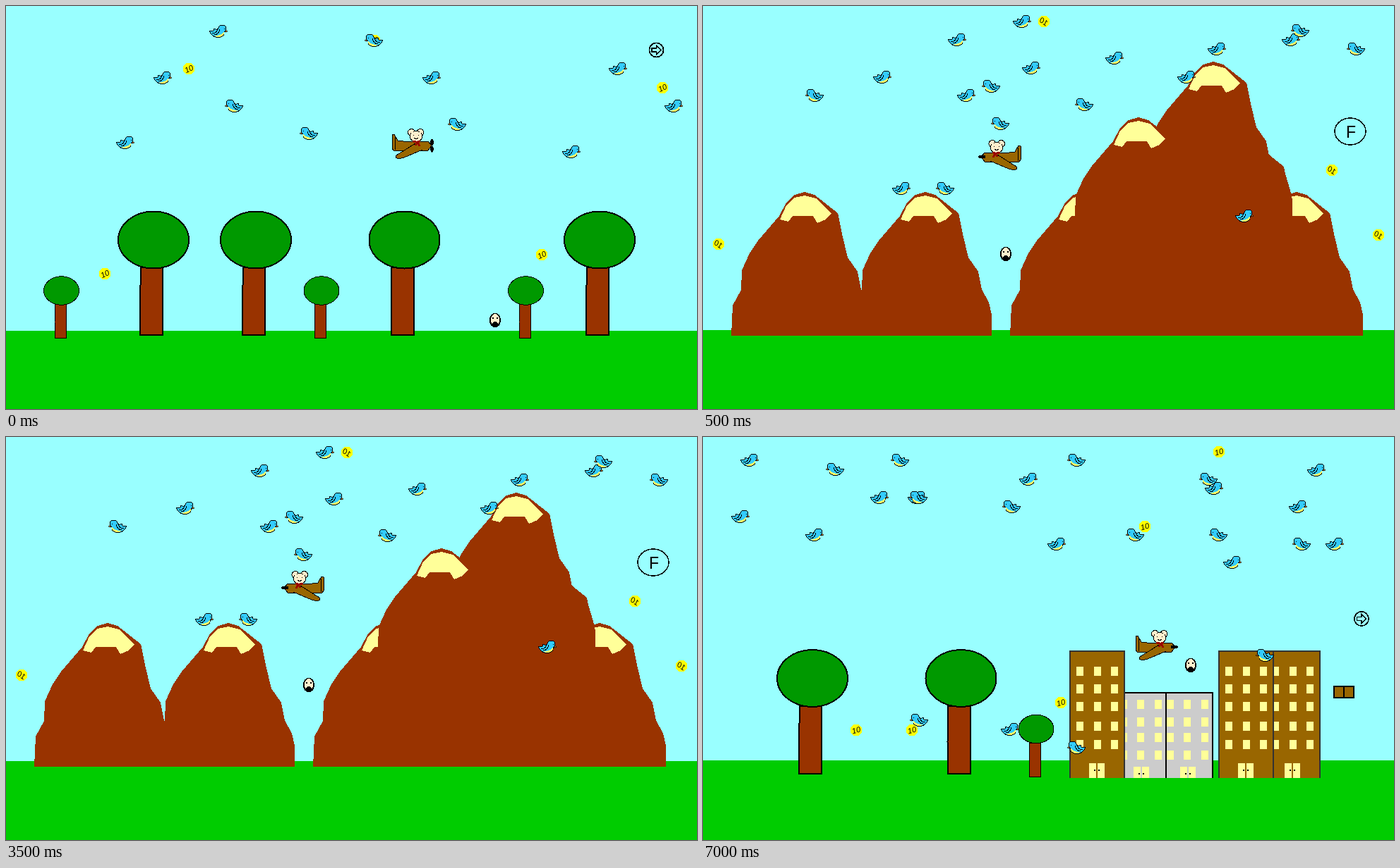
Animation of 979x572 px, one loop 8000 ms. Source, as an HTML page:

```html
<!DOCTYPE html>
<html lang="en">
<head>
<meta charset="utf-8">
<title>Flying mouse</title>
<style>
  html, body { margin: 0; width: 100%; height: 100%; overflow: hidden; background: #9ff; }
  svg { display: block; width: 100%; height: 100%; }
  text { font-family: "Liberation Sans", Arial, sans-serif; text-anchor: middle; }
</style>
</head>
<body>
<svg id="stage" viewBox="0 0 979 572" shape-rendering="crispEdges">
  <defs>
    <g id="bird" stroke="#000" stroke-width="1" stroke-linejoin="round">
      <path fill="#3cf" d="M-13 -1Q-9 0-7-1L-6-4-2-2 0-5Q1-9 6-9 11-9 11-3 11 0 8 1 9 8 0 8.5-9 9-13-1Z"/>
      <path fill="#ff6" stroke="none" d="M8 1Q8.500 7.500 0 8-4 8-5 6 4 6 8 1Z"/>
      <path fill="#f93" stroke-width=".7" d="M10-2 13 0 10 1Z"/>
      <path fill="none" d="M-9 3Q-3 3-1-3M-6 5Q0 5 2-3"/>
      <path d="M7.500-4h1"/>
    </g>
    <g id="tree" stroke="#000" stroke-width="2">
      <path fill="#930" d="M-18 39H13V135H-19V90Z"/>
      <ellipse fill="#090" rx="50" ry="40.500"/>
    </g>
    <g id="mountain">
      <path fill="#930" d="M40 468 42 425 54 403 55 375 66 351 78 333 108 298 118 279 130 268 144 264 158 268 172 279 191 294 198 328 205 357 219 377 224 402 234 421 238 438V468Z"/>
      <path fill="#ff9" d="M109 303 118 283 130 272 144 269 160 273 172 285 182 294 174 303 162 308 156 298H127L121 306Z"/>
    </g>
    <g id="egg">
      <ellipse rx="8" ry="10.500"/>
      <ellipse cy="-.5" rx="6" ry="8.500" fill="#ffefcc"/>
      <path d="M-4 9V4Q0-1 4 4V9ZM-4-4h2v2h-2ZM2-4h2v2h-2Z"/>
    </g>
    <g id="arrow" fill="none" stroke="#000" stroke-width="1.600">
      <circle r="10"/>
      <path d="M-6.500-2.500H0V-6L6.500 0 0 6V2.500H-6.500Z"/>
    </g>
    <g id="plane" stroke="#000" stroke-linejoin="round">
      <path fill="#960" d="M1 10 4 9 9 18 24 20 52 19 57 25 52 32 30 33 3 32 1 29Z"/>
      <path fill="none" d="M5 12V31"/>
      <path fill="#960" d="M34 22 7 39 6 42 10 44 18 42 44 31"/>
      <g fill="#ffefcc">
        <circle cx="28.500" cy="6.500" r="5"/>
        <circle cx="41" cy="6.500" r="5"/>
        <ellipse cx="35" cy="12" rx="9" ry="7.500"/>
        <path stroke="none" d="M28 5 33 6H37L42 5 42 9 35 13 28 9Z"/>
      </g>
      <path fill="none" d="M31 10h1M38 10h1M32 14q3 3 6 0"/>
      <path fill="none" stroke="#900" stroke-width="2.500" d="M30 19 36 20 41 19M37 20 34 25M37 20 40 26"/>
    </g>
  </defs>
</svg>
<script>
const stage = document.getElementById("stage");
const pairs = list => list.trim().split(/\s+/).map(p => p.split(",").map(Number));
const each = (list, draw) => pairs(list).map(p => draw(...p)).join("");
const use = (id, x, y, sx = 1, sy = 1) =>
  `<use href="#${id}" transform="translate(${x} ${y}) scale(${sx} ${sy})"/>`;
const rect = (x, y, w, h, fill, extra = "") =>
  `<rect x="${x}" y="${y}" width="${w}" height="${h}" fill="${fill}" ${extra}/>`;

const ground = y => rect(0, y, 979, 572 - y, "#0c0");
const trees = (list, size) => each(list, (x, y) => use("tree", x, y, size, size));
const mountains = list => each(list, (x, y) => use("mountain", x, y));
const birds = (right, left) =>
  each(right, (x, y) => use("bird", x, y)) + each(left, (x, y) => use("bird", x, y, -1));

const coins = (list, turn, flip = 1) => each(list, (x, y) =>
  `<g transform="translate(${x} ${y})"><circle r="8.500" fill="#ff0"/>
   <text transform="scale(${flip} 1) rotate(${turn})" y="4" font-size="11" font-style="italic">10</text></g>`);

function plane(x, y, flip, upright) {
  const prop = upright
    ? '<ellipse cx="57.500" cy="20.500" rx="2.200" ry="4.500"/><ellipse cx="57.500" cy="30" rx="2.200" ry="4.500"/>'
    : '<ellipse cx="54" cy="25" rx="3.500" ry="2.500"/><ellipse cx="58.500" cy="25" rx="2.500" ry="2"/>';
  return `<g transform="translate(${x} ${y}) scale(${flip} 1)"><use href="#plane"/>${prop}</g>`;
}

function building(x, top, fill, edge, cols, rows, door) {
  let s = `<path d="M${x} 484V${top}H${x + 77}V484" fill="${fill}" stroke="${edge}" stroke-width="2"/>`;
  for (const r of rows) for (const c of cols) s += rect(x + c, r, 10, 13, "#ff9");
  const y = 484 - door[1];
  for (const i of [0, 1]) {
    s += rect(x + door[0] + i * 12, y, 10, door[1], "#ff9");
    s += rect(x + door[0] + 7 + i * 6, y + 9, 2, 2, "#000");
  }
  return s;
}
const brown = x => building(x, 304, "#960", "#333", [9, 33.5, 58], [326, 351, 376, 404, 430], [27, 21]);
const gray = x => building(x, 363, "#ccc", "#000", [12, 36, 61], [373, 398, 420, 445], [31, 16]);

const forest = () => ground(461) +
  trees("209,332 354,332 564.5,332 841,332", 1) +
  trees("78.5,404 447,404 736.5,404", .5) +
  coins("259,89 930,116 759,353 140,380 522,49", -25) +
  birds("301,36 222,102 169,194 603,102 867,89 946,142 801,207",
        "521,49 323,142 429,181 639,168") +
  use("egg", 693, 446) + use("arrow", 921.5, 62.5) + plane(546, 173, 1, true);

const peaks = () => ground(460) +
  mountains("0,0 171,0 395,0 697,0") +
  '<path fill="#930" d="M528 268 600 200H795L803 212 823 228 825 238 832 262 835 275V468H600L528 310Z"/>' +
  mountains("579,-185 473,-106") +
  coins("483,22 891,233 957,325 22,338", -35, -1) +
  birds("452,22 360,48 254,101 465,88 373,127 583,74 728,61 833,48 685,101 281,259 767,298",
        "158,127 408,114 421,167 540,140 846,35 925,61 343,259") +
  '<ellipse cx="917" cy="178" rx="22" ry="19" fill="none" stroke="#000" stroke-width="1.500"/>' +
  '<text x="918" y="187" font-size="23">F</text>' +
  use("egg", 429, 352) + plane(451, 189, -1, false);

const town = () => ground(458.5) +
  trees("155,342.5 365.5,342.5", 1) + trees("472,414.5", .5) +
  gray(645) + gray(579) + brown(520) + brown(797) + brown(731) +
  coins("731,21 626,127 507,377 217,416 296,416", -15) +
  birds("66,33 53,113 158,139 250,86 461,60 303,86 501,152 869,47 843,99 750,178 895,152 435,415",
        "187,46 279,33 529,33 437,99 612,139 716,60 730,139 848,152 305,86 306,402 529,441 796,310") +
  use("bird", 724, 73) +
  '<path d="M894 354H922V370H894ZM908 354V370" fill="#960" stroke="#000" stroke-width="1.500"/>' +
  use("egg", 691, 324) + use("arrow", 933, 258) + plane(612, 273, 1, false);

const scenes = [forest, peaks, town].map(draw => {
  const g = document.createElementNS("http://www.w3.org/2000/svg", "g");
  g.innerHTML = rect(0, 0, 979, 572, "#9ff") + draw();
  stage.append(g);
  return g;
});

const start = performance.now();
function update(now) {
  const t = Math.max(0, now - start) % 8000;
  const shown = t < 500 ? 0 : t < 5500 ? 1 : 2;
  scenes.forEach((g, i) => g.setAttribute("display", i === shown ? "inline" : "none"));
  requestAnimationFrame(update);
}
update(start);
</script>
</body>
</html>
```
